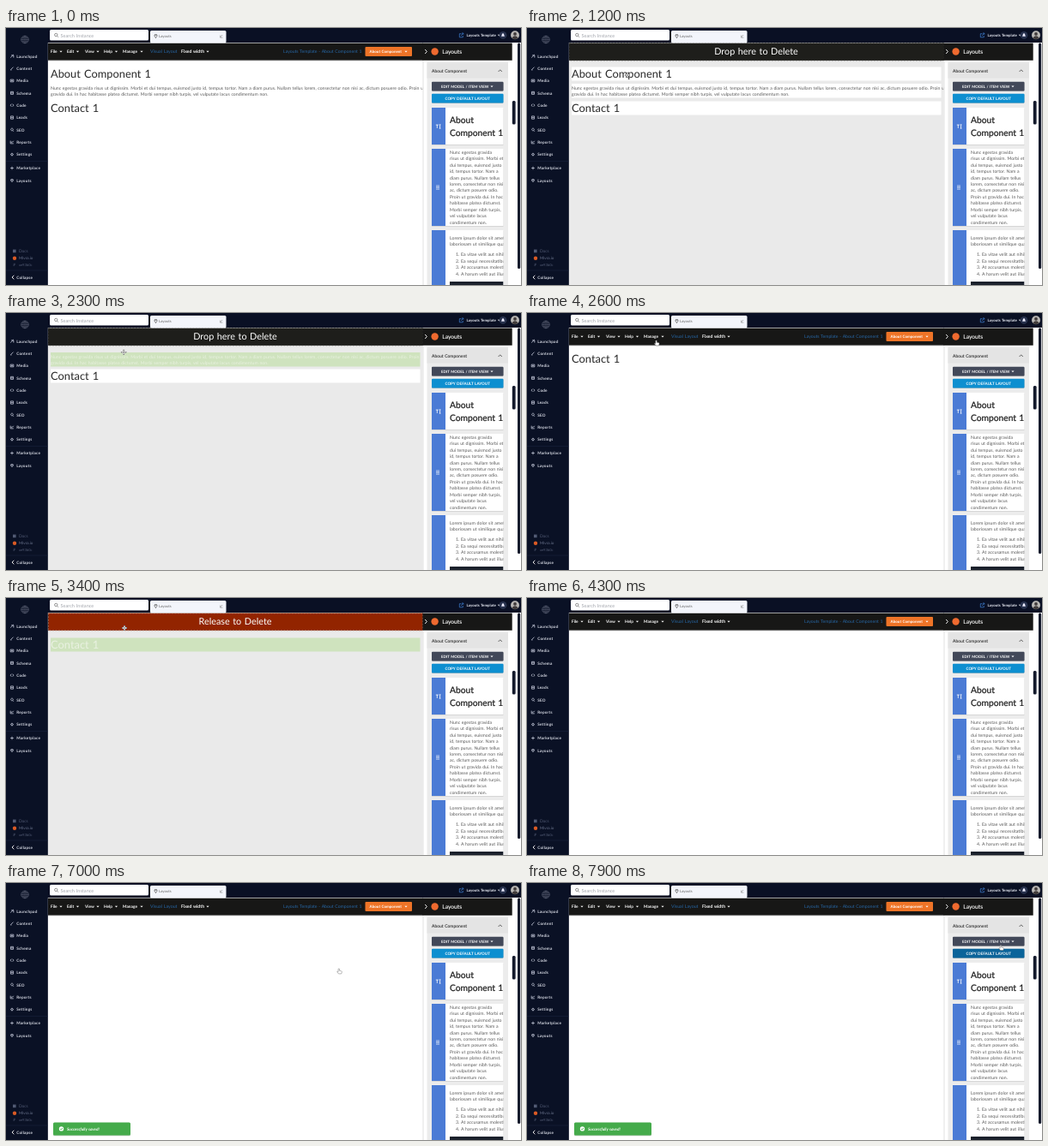
Animation of 600 by 300 pixels, one loop 8000 ms. Source, as an HTML page:

```html
<!DOCTYPE html>
<html lang="en">
<head>
<meta charset="utf-8">
<title>Layout editor</title>
<style>
  html, body { margin: 0; width: 100%; height: 100%; overflow: hidden; background: #0a1024; }
  svg { display: block; width: 600px; height: 300px; }
  text { font-family: Lato, "Open Sans", sans-serif; word-spacing: .067em; text-rendering: geometricPrecision; white-space: pre; }
</style>
</head>
<body>
<svg id="stage" viewBox="0 0 600 300"></svg>
<script>
const stage = document.getElementById('stage');
const $ = id => document.getElementById(id);

const rect = (x, y, w, h, fill, extra = '') =>
  `<rect x="${x}" y="${y}" width="${w}" height="${h}" fill="${fill}" ${extra}/>`;
const circle = (x, y, r, fill, extra = '') =>
  `<circle cx="${x}" cy="${y}" r="${r}" fill="${fill}" ${extra}/>`;
const text = (x, y, size, fill, str, extra = '') =>
  `<text x="${x}" y="${y}" font-size="${size}" fill="${fill}" ${extra}>${str}</text>`;
const line = (d, color, width = 0.8) =>
  `<path d="${d}" fill="none" stroke="${color}" stroke-width="${width}"/>`;
const caret = (x, y, fill = '#fff') =>
  `<path d="M${x - 1.6} ${y - .8}h3.2l-1.6 1.8z" fill="${fill}"/>`;
const group = (id, body, extra = '') => `<g id="${id}" ${extra}>${body}</g>`;
const bold = 'font-weight="700"';
const middle = 'text-anchor="middle"';
const bar = '#171716';

function sidebar() {
  const items = ['Launchpad', 'Content', 'Media', 'Schema', 'Code', 'Leads', 'SEO', 'Reports', 'Settings'];
  const icons = [
    'M-2 2L2 -2M-1 -1H2V2', 'M-1.7 1.7L1.7 -1.7M-2 2h1.5', 'M-2 -1.5H2V1.5H-2zM-1.5 1L0 -.5L1.5 1',
    'M-1.7 -1.7H1.7V1.7H-1.7zM-1.7 0H1.7', 'M-.8 -1.7L-2 0L-.8 1.7M.8 -1.7L2 0L.8 1.7',
    'M-1.7 -1.8H1.7V1.8H-1.7zM-1 0H1', 'M-1.5 -.5a1.5 1.5 0 1 1 0 .1M.8 .8L2 2',
    'M-2 -1.8V1.8H2M-1.2 .8L0 -.6L.6 0L2 -1.6', 'M-1.3 0a1.3 1.3 0 1 0 2.6 0a1.3 1.3 0 1 0 -2.6 0M0 -2V-1.3M0 1.3V2M-2 0H-1.3M1.3 0H2'
  ];
  const spaced = `${bold} letter-spacing=".2"`;
  const label = (str, y) => text(12.2, y + 1.7, 4.65, '#d6d9e3', str, spaced);
  const icon = (d, y) => `<g transform="translate(7 ${y}) scale(.9)">${line(d, '#c3c8d8', .9)}</g>`;
  const dim = '#525b74';
  return rect(0, 0, 48.6, 300, '#0a1125') +
    circle(22, 13.5, 4.3, 'none', 'stroke="#6b7184" stroke-width=".6"') +
    line('M17.6 13.5H26.4M22 9.1V17.9M18.4 11.3H25.6M18.4 15.7H25.6M22 9.1C19 12 19 15 22 17.9C25 15 25 12 22 9.1', '#6b7184', .45) +
    items.map((name, i) => label(name, 32.8 + i * 14.35) + icon(icons[i], 32.8 + i * 14.35)).join('') +
    line('M0 155.5H48.6M0 283H48.6', '#1b2440', .5) +
    label('Marketplace', 163.5) + icon('M-2 0H2M0 -2V2', 163.5) +
    label('Layouts', 178) + icon('M-1.5 -1H1.5V.4L0 1.4L-1.5 .4zM-.8 -2V-1M.8 -2V-1M0 1.4V2.2', 178) +
    rect(8, 258.6, 3.6, 3.6, dim) + text(15, 262.2, 4.8, dim, 'Docs') +
    circle(10, 268.7, 2.2, '#dc5b25') + text(15, 270.4, 4.6, '#69728b', 'Mivra.io') +
    text(8.2, 278.4, 4.6, dim, '#') + text(15, 278.4, 4.1, dim, 'xe93b0c') +
    line('M9.3 288.8L7 291L9.3 293.2', '#fff', .9) + label('Collapse', 291);
}

function topBar() {
  return rect(0, 0, 600, 17, '#0a1024') +
    rect(51, 2, 115, 12.6, '#fff', 'rx="1.5"') +
    circle(58.3, 8, 1.7, 'none', 'stroke="#777" stroke-width=".8"') + line('M59.5 9.3L61 10.8', '#777') +
    text(63.5, 10.5, 5.6, '#a3a6ad', 'Search Instance') +
    rect(168, 3, 88.5, 14.5, '#f3f5fb', 'rx="1.5"') +
    line('M173 8.2H176V9.8L174.5 11L173 9.8ZM173.8 7V8M175.2 7V8M174.5 11V12', '#555', .7) +
    text(178, 11.4, 4.3, '#666', 'Layouts') +
    line('M249.6 11L252 8M249.6 8.5V11.2H252.4', '#888', .6) +
    line('M530.5 6.7H528.3V10.8H532.3V9M530.2 9L532.6 6.2M531 6H532.8V7.8', '#3f83d8', .7) +
    text(536.5, 10.3, 4.4, '#e8ebf3', 'Layouts Template', bold) + caret(574.4, 8.6) +
    circle(579, 8.3, 4.4, '#28324e') +
    '<path d="M577 9.8L577.6 8.6Q577.6 6.2 579 6.2T580.4 8.6L581 9.8Z" fill="#eef"/>' +
    circle(593, 8.3, 5, '#b9b7b4') + circle(593, 6.9, 1.9, '#403b3b') +
    '<path d="M589.4 11.6Q593 6.9 596.6 11.6A5 5 0 0 1 589.4 11.6Z" fill="#403b3b"/>';
}

function menuBar() {
  const menus = [['File', 52, 64], ['Edit', 71, 83.5], ['View', 92, 107], ['Help', 114, 128.5], ['Manage', 136, 158]];
  return rect(49, 17.6, 437, 20.2, bar) + rect(49, 37.8, 437, 1, '#dcdcdc') +
    menus.map(([name, x, arrow]) => text(x, 29.3, 4.75, '#fff', name, bold) + caret(arrow, 27.5)).join('') +
    text(168, 29.4, 5.3, '#2767a6', 'Visual Layout') +
    text(204, 29.4, 5.15, '#fff', 'Fixed width', bold) + caret(235, 27.5) +
    text(323, 29.4, 5.15, '#2767a6', 'Layouts Template - About Component 1') +
    rect(418.5, 22, 54.5, 10.9, '#ef7427', 'rx="1"') +
    text(423.6, 29.1, 4.5, '#fff', 'About Component', bold) + caret(466, 27.6);
}

const dashed = color => `stroke="${color}" stroke-width=".7" stroke-dasharray="2 1.5"`;
const dropBar = (id, fill, border, str) => group(id,
  rect(49.4, 17.8, 436, 20, fill, dashed(border)) + text(267, 31.2, 10.85, '#fff', str, middle));

const ink = '#292929', grey = '#595959';
const blocks = [
  { height: 20, box: [45.5, 16], body: text(52, 57.6, 12.83, ink, 'About Component 1') },
  { height: 20, box: [65, 16.5], body:
      text(52, 71.8, 5.19, grey, 'Nunc egestas gravida risus ut dignissim. Morbi et dui tempus, euismod justo id, tempus tortor. Nam a diam purus. Nullam tellus lorem, consectetur non nisi ac, dictum posuere odio. Proin ut') +
      text(52, 79.3, 5.19, grey, 'gravida dui. In hac habitasse platea dictumst. Morbi semper nibh turpis, vel vulputate lacus condimentum non.') },
  { height: 20, box: [85.5, 16], body: text(52, 97.7, 12.9, ink, 'Contact 1') }
];

function page() {
  return rect(48.6, 17, 552, 283, '#fff') + rect(49, 38, 437, 262, '#fff', 'id="paper"') +
    blocks.map(({ box, body }, i) => group('block' + i,
      rect(52, box[0], 430.5, box[1], '#fff', `id="box${i}"`) + body)).join('');
}

function panel() {
  const card = (y, h) => rect(496, y + .6, 83.5, h, '#c9c9c9') +
    rect(496, y, 83.5, h, '#fff') + rect(496, y, 16, h, '#4b7bd5');
  const title = (y, str) => text(517, y, 10.25, '#1c1c1c', str, 'stroke="#1c1c1c" stroke-width=".22"');
  const para = ['Nunc egestas gravida', 'risus ut dignissim. Morbi et', 'dui tempus, euismod justo',
    'id, tempus tortor. Nam a', 'diam purus. Nullam tellus', 'lorem, consectetur non nisi',
    'ac, dictum posuere odio.', 'Proin ut gravida dui. In hac', 'habitasse platea dictumst.',
    'Morbi semper nibh turpis,', 'vel vulputate lacus', 'condimentum non.'];
  const list = ['Ea vitae velit aut nihil', 'Ea sequi necessitatibus', 'At accusamus molestias', 'A harum velit aut illum'];
  const button = (y, fill, id) => rect(496, y + .7, 83.5, 10.6, '#bbb', 'rx="1"') +
    rect(496, y, 83.5, 10.6, fill, `rx="1" id="${id}"`);
  return rect(485.5, 38, 114.5, 262, '#fff') + rect(485.5, 38, 1, 262, '#e2e2e2') +
    rect(485.5, 17.6, 104.2, 20.2, bar) +
    line('M488.2 25L490.4 27.5L488.2 30', '#fff', .9) +
    circle(499.6, 27.5, 4.2, '#ef6a2f') +
    text(508.3, 29.9, 6.7, '#fff', 'Layouts', 'stroke="#fff" stroke-width=".1"') +
    rect(490.5, 38.5, 94.5, 262, '#ececec') + rect(490.5, 41, 94.5, 17.5, '#e4e4e4') +
    text(496, 51.8, 5, '#333', 'About Component', 'stroke="#333" stroke-width=".1"') +
    line('M573.6 51L575.7 48.8L577.8 51', '#444', .8) +
    button(62.8, '#424859', 'edit') + text(507, 70, 4.45, '#fff', 'EDIT MODEL / ITEM VIEW', bold) + caret(566, 68.3) +
    button(76.8, '#0e8fd0', 'copy') + text(537.7, 83.8, 4.6, '#fff', 'COPY DEFAULT LAYOUT', `${bold} ${middle}`) +
    card(93, 43) + line('M500.8 113.1H503.8M502.3 113.1V116.9M505.6 112.8V117.2M504.8 112.8H506.4M504.8 117.2H506.4', '#fff', .8) +
    title(111, 'About') + title(126.1, 'Component 1') +
    card(141, 90) + line('M501 184H505M501 185.4H505M501 186.8H505M501 188.2H505', '#dfe7f8', .7) +
    card(236, 66) +
    group('cardtext',
      para.map((str, i) => text(517, 146.7 + i * 7.45, 5.19, grey, str)).join('') +
      text(517, 246.8, 5.25, grey, 'Lorem ipsum dolor sit amet,') +
      text(517, 254.3, 5.25, grey, 'laboriosam ut similique quae') +
      list.map((str, i) => text(524, 266.4 + i * 7.5, 5.25, grey, `${i + 1}.`) +
        text(530, 266.4 + i * 7.5, 5.25, grey, str)).join('') +
      rect(517, 296, 62.5, 4, '#1b212c'), 'clip-path="url(#cardclip)"') +
    rect(589.8, 85, 3.8, 27.5, '#141a2c', 'rx="1.5"') + rect(596, 17.6, 3.2, 263.4, '#141a2c', 'rx="1.5"');
}

const toast = group('toast',
  rect(55, 280.2, 90, 15, '#b9c9b9', 'rx="1.5"') + rect(55, 279.4, 90, 15, '#45ab4b', 'rx="1.5"') +
  circle(64.5, 286.9, 2.7, '#fff') + line('M63.2 287L64.2 288L65.9 286', '#45ab4b', .8) +
  text(71, 288.6, 4.7, '#fff', 'Successfully saved!', `${bold} font-style="italic"`));

const hand = group('hand', '<path transform="scale(.8)" d="M-1 0Q0 -1 .8 0V2.5L3.6 3.1Q4.6 3.5 4.2 5L3.5 7H-.5L-2.8 4.2Q-2.5 3 -1 4Z" fill="#fff" stroke="#666" stroke-width=".6"/>');
const moveIcon = group('move',
  line('M-3 0H3M0 -3V3', '#fff', 1.9) + line('M-3 0H3M0 -3V3M-2 -1L-3 0L-2 1M2 -1L3 0L2 1M-1 -2L0 -3L1 -2M-1 2L0 3L1 2', '#555', .6));

stage.innerHTML =
  `<defs><clipPath id="cardclip">${rect(512, 141, 67.5, 159, '#fff')}</clipPath></defs>` +
  page() + menuBar() + dropBar('drop', '#1e1e1b', '#3c3c38', 'Drop here to Delete') +
  dropBar('release', '#922400', '#c98268', 'Release to Delete') +
  panel() + topBar() + sidebar() + toast + group('cursor', hand + moveIcon);

// start of drag, entering the delete bar, release
const drags = [[1100, 1380, 1620], [2150, 2350, 2530], [3000, 3250, 3600]];
// time, x, y
const path = [[250, 150, 34], [900, 117, 55], [1220, 117, 55], [1450, 142, 33], [1700, 150, 36], [1780, 150, 36],
  [2050, 130, 53], [2220, 130, 53], [2420, 150, 33], [2720, 151, 32], [2950, 112, 54], [3080, 112, 54],
  [3320, 138, 35], [3900, 138, 35], [6700, 330, 110], [7600, 552, 73]];

const show = (id, on) => $(id).style.display = on ? '' : 'none';

function position(t) {
  const next = path.findIndex(p => p[0] > t);
  if (next < 1) return path[next ? path.length - 1 : 0].slice(1);
  const [t0, x0, y0] = path[next - 1], [t1, x1, y1] = path[next];
  const k = (t - t0) / (t1 - t0), e = k * k * (3 - 2 * k);
  return [x0 + (x1 - x0) * e, y0 + (y1 - y0) * e];
}

function render(t) {
  const removed = drags.filter(d => t >= d[2]).length;
  const drag = drags[removed];
  const dragging = !!drag && t >= drag[0];
  const over = dragging && t >= drag[1];

  show('drop', dragging && !over);
  show('release', over);
  $('paper').setAttribute('fill', dragging ? '#eaeaea' : '#fff');
  const shift = blocks.slice(0, removed).reduce((sum, b) => sum + b.height, 0);
  blocks.forEach((_, i) => {
    const block = $('block' + i), held = dragging && i === removed && t >= drag[0] + 150;
    show('block' + i, i >= removed);
    block.setAttribute('transform', `translate(0 ${-shift + (held ? 1 : 0)})`);
    $('box' + i).setAttribute('fill', held ? '#cfe3be' : '#fff');
    block.querySelectorAll('text').forEach(el => el.style.fill = held ? '#e9f1e1' : '');
  });

  show('toast', t >= 5600);
  $('toast').style.opacity = Math.min(1, (t - 5550) / 200);
  $('copy').setAttribute('fill', t >= 7500 ? '#0b649a' : '#0e8fd0');

  const [x, y] = position(t);
  show('cursor', t >= 250 && t < 3900 || t >= 6700);
  show('hand', !dragging);
  show('move', dragging);
  $('cursor').setAttribute('transform', `translate(${x} ${y})`);
}

function tick() {
  render(performance.now() % 8000);
  requestAnimationFrame(tick);
}
tick();
</script>
</body>
</html>
```
